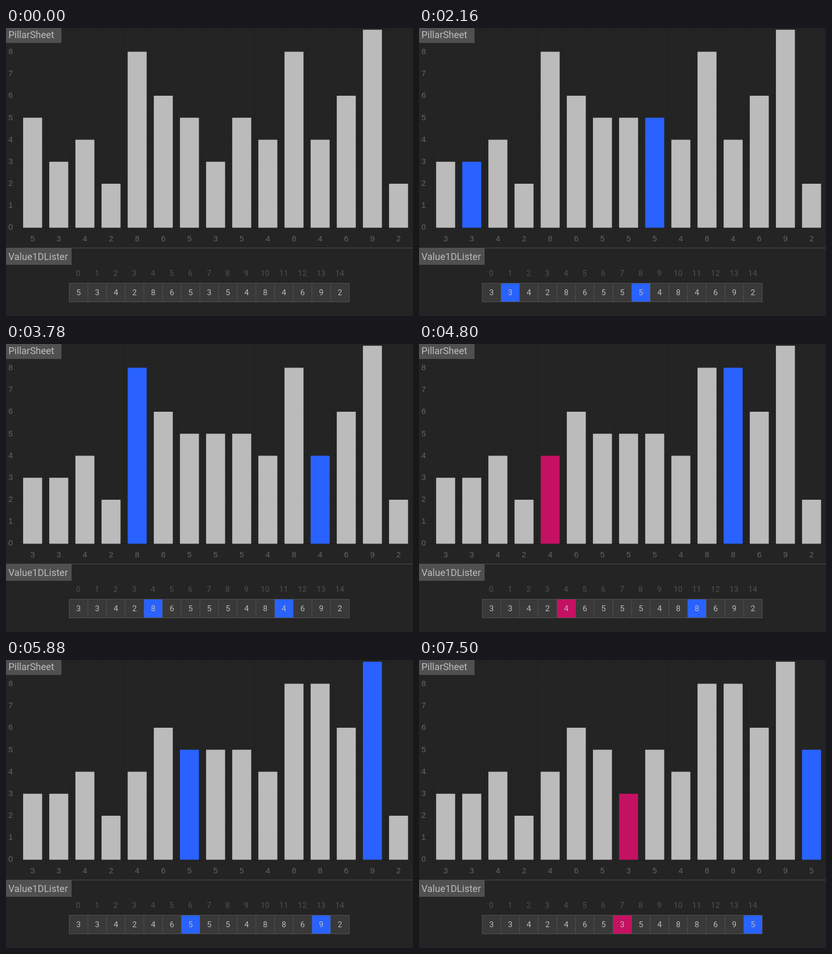
Recreate the animation shown at these times as an HTML page with a canvas. Size 763 by 540 pixels, loop 8 s.

```html
<!DOCTYPE html>
<html lang="en">
<head>
<meta charset="utf-8">
<title>Shell sort</title>
<style>
  html, body { margin: 0; width: 100%; height: 100%; overflow: hidden; background: #242424; }
  canvas { display: block; }
</style>
</head>
<body>
<canvas id="stage" width="763" height="540"></canvas>
<script>
const ctx = document.getElementById('stage').getContext('2d');
const W = 763, H = 540, LOOP = 8000, GAP = 7;
const BLUE = '#2962ff', PINK = '#c51162', LIGHT = '#bbbbbb', EDGE = '#505050';
const UI = 'Roboto, sans-serif';
const AXIS = '"Liberation Sans", Arial, sans-serif';
const BASE = 374.5, UNIT = 41.25, STEP = 49;
const starts = [0, 540, 1080, 1620, 2160, 2700, 3180, 3780,
  4320, 4800, 5340, 5880, 6420, 6960, 7500];

// One pass of gapped insertion sort, recorded step by step.
function record(values) {
  const a = values.slice();
  const steps = [{ a: values, picked: [], hit: -1 }];
  const add = (picked, hit) => steps.push({ a: a.slice(), picked, hit });
  for (let i = GAP; i < a.length; i++) {
    const held = a[i], picked = [i - GAP, i];
    let j = i;
    add(picked, -1);
    while (j >= GAP && a[j - GAP] > held) {
      a[j] = a[j - GAP];
      add(picked, j);
      j -= GAP;
    }
    if (j !== i) {
      a[j] = held;
      add(picked, j);
    }
  }
  return steps;
}

const steps = record([5, 3, 4, 2, 8, 6, 5, 3, 5, 4, 8, 4, 6, 9, 2]);

function rect(x, y, w, h, color) {
  ctx.fillStyle = color;
  ctx.fillRect(x, y, w, h);
}

function text(s, x, y, size, family, color, align = 'center') {
  ctx.font = `${size}px ${family}`;
  ctx.textAlign = align;
  ctx.fillStyle = color;
  ctx.fillText(s, x, y);
}

function tone(step, i, plain) {
  if (i === step.hit) return PINK;
  return step.picked.includes(i) ? BLUE : plain;
}

function drawChart(step) {
  const grid = 'rgba(0,0,0,0.1)';
  for (let i = 0; i <= 15; i++) rect(25 + STEP * i, 0, 1, 381, grid);
  for (let v = 0; v <= 9; v++) {
    rect(16, Math.round(BASE - 0.5 - UNIT * v), W - 16, 1, v ? grid : 'rgba(0,0,0,0.25)');
    if (v < 9) text(v, 4.5, 378 - 41.1 * v, 15, AXIS, '#666666', 'left');
  }
  step.a.forEach((v, i) => {
    rect(32.1 + STEP * i, BASE - UNIT * v, 35.6, UNIT * v, tone(step, i, LIGHT));
    text(v, 50 + STEP * i, 400, 15, AXIS, '#666666');
  });
}

function drawArray(step) {
  rect(0, 412, W, 1, EDGE);
  rect(118, 478, 526, 36, EDGE);
  step.a.forEach((v, i) => {
    const x = 118 + 35 * i;
    rect(x + 1, 479, 34, 34, tone(step, i, '#393939'));
    text(i, x + 17.5, 465, 15, UI, EDGE);
    text(v, x + 18, 501, 15, UI, LIGHT);
  });
}

function drawTag(s, y, w, h, baseline) {
  rect(0, y, w, h, EDGE);
  text(s, 4.5, baseline, 18, UI, LIGHT, 'left');
}

function render(t) {
  const step = steps[starts.findLastIndex(s => s <= t)];
  rect(0, 0, W, H, '#242424');
  drawChart(step);
  drawArray(step);
  drawTag('PillarSheet', 0, 104, 28, 19);
  drawTag('Value1DLister', 412, 123, 32, 435);
}

const origin = performance.now();
function tick() {
  render((performance.now() - origin) % LOOP);
  requestAnimationFrame(tick);
}
tick();
</script>
</body>
</html>
```
